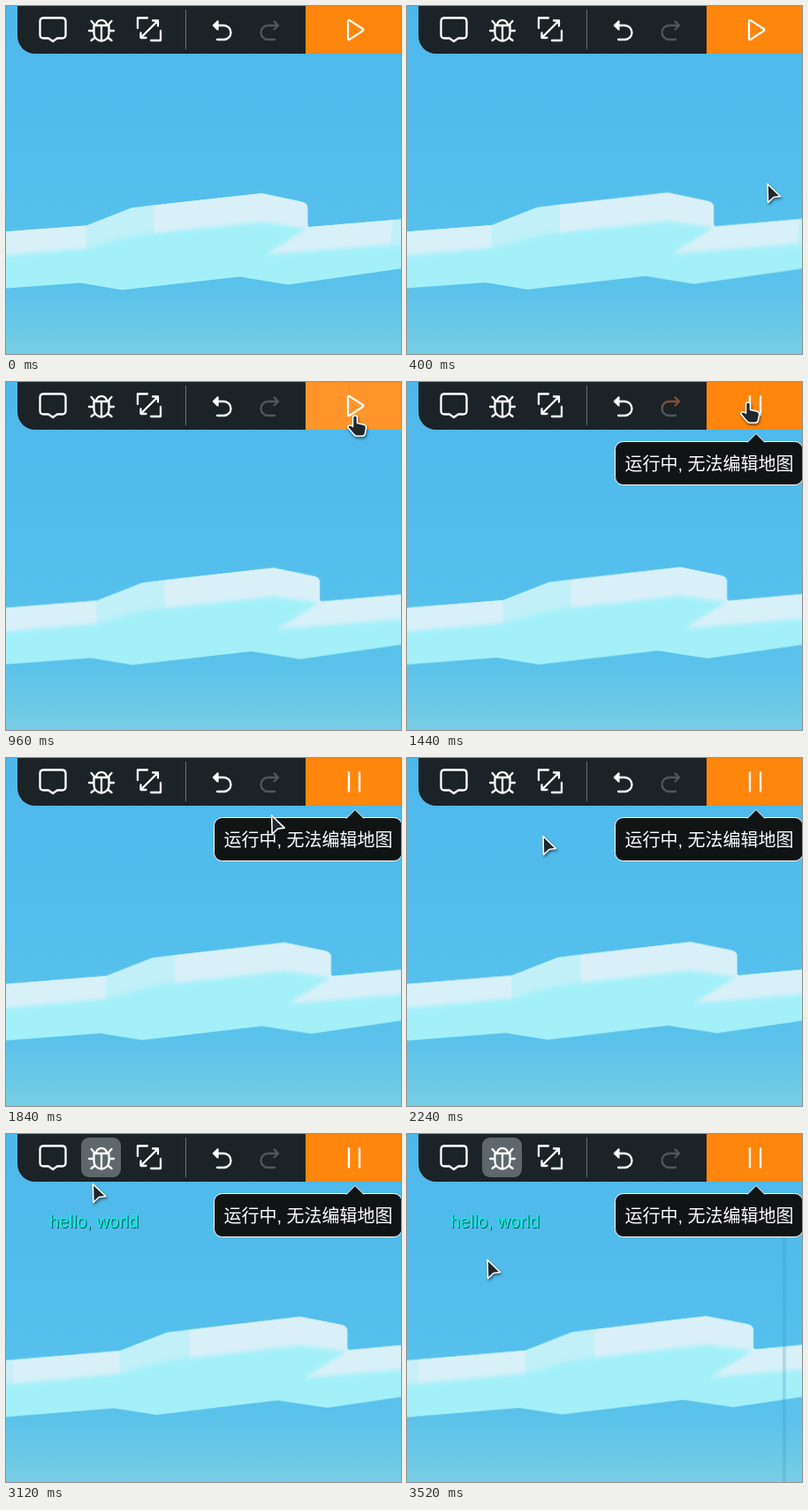
Write an HTML page that moves like this. It is 447 by 394 pixels and loops after 4020 ms.

```html
<!DOCTYPE html>
<html lang="zh">
<head>
<meta charset="utf-8">
<style>
html, body { margin: 0; width: 100%; height: 100%; overflow: hidden; background: #53bdec; }
svg { display: block; }
text { font: 20px "Liberation Sans", "Noto Sans CJK SC", "Noto Sans CJK", sans-serif; }
.icon { fill: none; stroke: #fff; stroke-width: 2.3; stroke-linecap: round; stroke-linejoin: round; }
.cursor { fill: #20282c; stroke: #fff; stroke-width: 1.6; stroke-linejoin: round; filter: drop-shadow(1px 2px 1.5px rgba(0,0,0,.5)); }
.hello { fill: #12f3d4; text-shadow: 1px 1px 0 #0b5560; }
</style>
</head>
<body>
<svg width="447" height="394" viewBox="0 0 447 394">
  <defs>
    <linearGradient id="sky" x1="0" y1="0" x2="0" y2="1">
      <stop offset="0" stop-color="#4db8ea"/>
      <stop offset=".5" stop-color="#53beed"/>
      <stop offset=".82" stop-color="#5bc2ea"/>
      <stop offset="1" stop-color="#77cee4"/>
    </linearGradient>
    <linearGradient id="redoTint" x1="0" y1="0" x2="0" y2="1">
      <stop offset=".4" stop-color="#84503c"/>
      <stop offset=".7" stop-color="#50575a"/>
    </linearGradient>
    <filter id="soft" x="-10%" y="-20%" width="120%" height="140%">
      <feGaussianBlur stdDeviation=".7 2.4"/>
    </filter>
    <filter id="edge">
      <feGaussianBlur stdDeviation=".6"/>
    </filter>
    <clipPath id="shape">
      <path d="M-80 262L92 249L143 229L168 226L290 212.5L335 222Q342 223.500 342 229V248Q342 251 345 250.700L540 234V285L320 316L265 307L132 322L85 314L-80 326Z"/>
    </clipPath>
  </defs>

  <rect width="447" height="394" fill="url(#sky)"/>

  <g id="cloud" filter="url(#edge)">
    <g clip-path="url(#shape)">
      <rect x="-80" y="200" width="640" height="130" fill="#a4f0f9"/>
      <g filter="url(#soft)">
        <path d="M-80 240H92V275L-80 290Z" fill="#d8f0f8"/>
        <path d="M-80 240H-26V285L-80 290Z" fill="#c8eff7"/>
        <path d="M92 205H169V257L135 263L92 275Z" fill="#c1f0f8"/>
        <path d="M168 195H352V254L338 252L290 245L168 258Z" fill="#d9f0f8"/>
        <path d="M294 282L345 250V230H560V258L447 270Z" fill="#d8f0f8"/>
        <path d="M441 228H560V260L435 272Z" fill="#c1f0f8"/>
      </g>
    </g>
  </g>

  <rect id="seam" x="425" y="117" width="4" height="277" fill="#3a8fc0" opacity=".25"/>

  <path d="M13 0H339V54H33A20 20 0 0 1 13 34Z" fill="#1b2327"/>
  <rect id="bugBox" x="85" y="4" width="45" height="45" rx="9"/>
  <g class="icon">
    <path d="M42.500 13.500H63.500Q67.500 13.500 67.500 17.500V32.500Q67.500 36.500 63.500 36.500H58L53 40L48 36.500H42.500Q38.500 36.500 38.500 32.500V17.500Q38.500 13.500 42.500 13.500Z"/>
    <path d="M99.500 22H116.500V31A8.500 8.500 0 0 1 99.500 31ZM102 21A6.200 6.500 0 0 1 114 21M108 23V39M94 28H99M117 28H122M96.500 17L100 21M119.500 17L116 21M96.500 39L101 35.500M119.500 39L115 35.500"/>
    <path d="M149 25V13.500H160M175 28V39H164M153 35.500L171.500 17M166 16.500H172V22.500M152.500 30.500V36H158.500"/>
    <path d="M235 22H246.500A8 8 0 0 1 246.500 38H239"/>
    <path d="M239.500 17.500L235 22L239.500 26.500Z" fill="#fff"/>
    <path id="redo" d="M303.500 17.500L308 22L303.500 26.500M308 22H296.500A8 8 0 0 0 296.500 38H304"/>
  </g>
  <path d="M203.500 4V49" stroke="#666d70"/>

  <rect id="button" x="339" width="108" height="54"/>
  <path id="play" class="icon" d="M387 17.500Q387 15 389.200 16.400L403.500 25.700Q405 27 403.500 28.200L389.200 37.600Q387 39 387 36.500Z"/>
  <path id="pause" d="M388 15.500V38.500M400 15.500V38.500" stroke="#fff" stroke-width="2.4"/>

  <g id="tip" fill="#111415" stroke="#fff">
    <rect x="235.500" y="67.500" width="212.500" height="49" rx="9"/>
    <path d="M385 68.500L395 58.500L405 68.500"/>
    <text x="246.500" y="100" fill="#fff" stroke="none">运行中, 无法编辑地图</text>
  </g>
  <text id="hello" class="hello" x="49" y="106">hello, world</text>

  <g id="pointer" class="cursor">
    <path id="arrow" d="M0 .5L14.500 14.500L7 15.500L.5 21.500Z"/>
    <path id="hand" d="M-2.500 2.500a2.500 2.500 0 0 1 5 0v6l7.500 1.800q3 .8 2.600 4l-1 5q-.5 4-4 4h-5q-2.500 0-4-2l-6-7q-1.500-2 .5-3t4 .8l.4.4z"/>
  </g>
</svg>

<script>
const LOOP = 4020, STEP = 80, LAST = 3520;
const RUN = 1200, DEBUG = 2880, HELLO = 2960;

// time, x, y
const route = [
  [80, 424, 362], [400, 408, 201], [720, 398, 70], [960, 395, 38],
  [1200, 392, 32], [1440, 386, 23], [1760, 330, 60], [2240, 154, 88],
  [2480, 112, 48], [2720, 102, 22], [2960, 101, 24], [3200, 97, 72], [3520, 91, 142]
];

const $ = id => document.getElementById(id);
const show = (id, on) => $(id).setAttribute("visibility", on ? "visible" : "hidden");
const paint = (id, prop, value) => { $(id).style[prop] = value; };

function pointerAt(t) {
  let i = 0;
  while (i < route.length - 2 && t > route[i + 1][0]) i++;
  const [t0, x0, y0] = route[i], [t1, x1, y1] = route[i + 1];
  const k = Math.min(1, Math.max(0, (t - t0) / (t1 - t0)));
  return [x0 + (x1 - x0) * k, y0 + (y1 - y0) * k];
}

function draw(t) {
  // The cloud drifts along its slope, slightly faster on the right.
  const p = t / LAST;
  $("cloud").setAttribute("transform",
    `matrix(${1 + 0.031 * p} ${-0.012 * p} 0 1 ${40 * p - 0.7} ${-2.3 * p - 0.6})`);

  const [x, y] = pointerAt(t);
  const inBar = y < 54;
  const overButton = inBar && x > 339;
  const overBug = inBar && x > 85 && x < 130;
  const over = overButton || overBug;
  const running = t >= RUN, shown = t >= STEP;

  $("pointer").setAttribute("transform", `translate(${x} ${y})`);
  show("arrow", shown && !over);
  show("hand", shown && over);

  show("play", !running);
  show("pause", running);
  show("tip", running);
  show("hello", t >= HELLO);
  show("seam", t >= 3440);
  paint("button", "fill", overButton && !running ? "#ff952a" : "#ff860d");

  show("bugBox", overBug || t >= DEBUG);
  paint("bugBox", "fill", t >= DEBUG ? "#5e676b" : "#3f474a");
  paint("redo", "stroke", t >= 1360 && t <= 1520 ? "url(#redoTint)" : "#50575a");
}

const start = performance.now();
function tick() {
  const t = (performance.now() - start) % LOOP;
  draw(Math.min(LAST, Math.floor(t / STEP) * STEP));
  requestAnimationFrame(tick);
}
tick();
</script>
</body>
</html>
```
